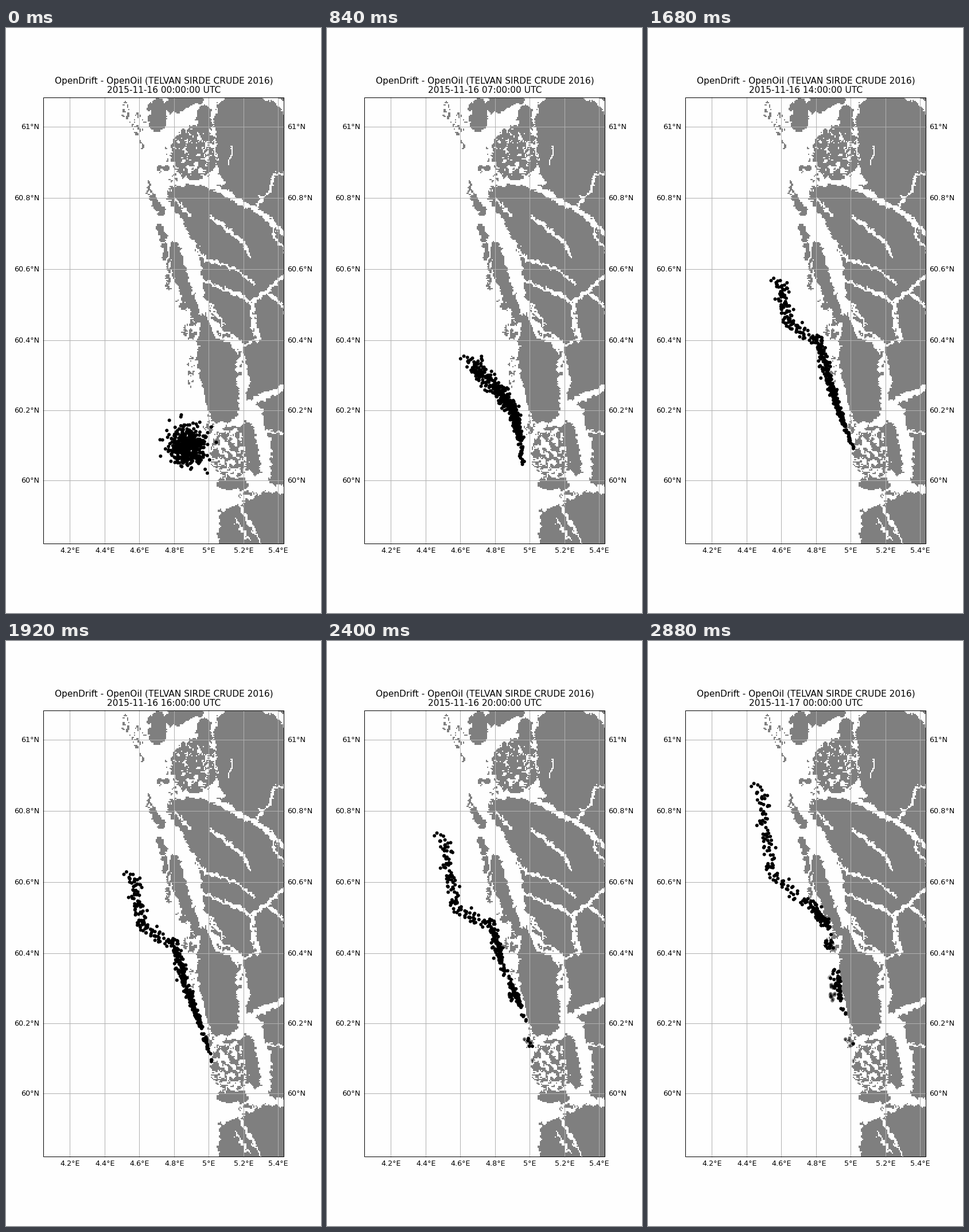
A matplotlib script for the animation above (3 s loop, 549x1019 px).

```python
import numpy as np
import matplotlib.pyplot as plt
from matplotlib.animation import FuncAnimation
from matplotlib.patches import Rectangle

W, H, DPI = 549, 1019, 64
PX = 72 / DPI  # points per pixel
HOURS = 25
LEFT, TOP, RIGHT, BOTTOM = 65, 121, 485, 899
CELL = 2
PAPER = "#fefefe"

plt.rcParams["font.family"] = "DejaVu Sans"
rng = np.random.default_rng(16)

# ---------------------------------------------------------------- land mask
gx, gy = np.meshgrid(np.arange(LEFT + 1, RIGHT, CELL), np.arange(TOP + 1, BOTTOM, CELL))


def smooth_noise():
    n = rng.normal(size=gx.shape)
    for axis in (0, 1):
        n = n + np.roll(n, 1, axis) + np.roll(n, -1, axis)
    return n / n.std()


# Sampling the shapes at shifted places gives a ragged coastline.
sx, sy = gx + 1.6 * smooth_noise(), gy + 1.6 * smooth_noise()


def points(flat):
    return np.array(flat, float).reshape(-1, 2)


def stroke(value, w0, w1, *flat):
    """Paint land (True) or water (False) along a line whose width goes from w0 to w1."""
    line = points(flat)
    parts = len(line) - 1
    for i, ((ax_, ay_), (bx, by)) in enumerate(zip(line[:-1], line[1:])):
        dx, dy = bx - ax_, by - ay_
        s = np.clip(((sx - ax_) * dx + (sy - ay_) * dy) / (dx * dx + dy * dy), 0, 1)
        width = w0 + (w1 - w0) * (i + s) / parts
        land[np.hypot(sx - ax_ - s * dx, sy - ay_ - s * dy) < width / 2] = value


def skerries(x, y, rx, ry, cover):
    """Broken-up islets that cover a share of an ellipse."""
    noise = smooth_noise()
    inside = ((sx - x) / rx) ** 2 + ((sy - y) / ry) ** 2 < 1
    land[inside & (noise > np.quantile(noise, 1 - cover))] = True


# mainland: everything east of its western edge
edge = points((388, 121, 367, 134, 362, 160, 367, 250, 385, 272, 284, 277, 284, 302,
               305, 330, 320, 365, 338, 400, 346, 470, 366, 515, 412, 545, 425, 615,
               418, 650, 448, 665, 450, 700, 462, 712, 460, 800, 440, 818, 372, 842, 370, 899))
land = sx > np.interp(sy, edge[:, 1], edge[:, 0])

# fjords and sounds
stroke(False, 14, 6, 345, 269, 380, 286, 410, 304, 440, 319, 466, 341, 490, 366)
stroke(False, 5, 5, 490, 251, 467, 255, 460, 282, 438, 308)
stroke(False, 5, 5, 465, 338, 466, 362, 490, 390)
stroke(False, 4, 4, 296, 300, 320, 326)
stroke(False, 6, 6, 357, 329, 414, 372, 423, 395)
stroke(False, 6, 4, 325, 372, 345, 402, 398, 419, 433, 446)
stroke(False, 5, 7, 338, 437, 410, 466, 426, 480, 458, 454, 490, 427)
stroke(False, 9, 9, 428, 482, 432, 520, 441, 540)
stroke(False, 5, 5, 441, 542, 414, 552)
stroke(False, 5, 5, 456, 460, 480, 483, 488, 500)
stroke(False, 5, 5, 350, 475, 378, 517)
stroke(False, 3, 3, 394, 205, 391, 240)
stroke(False, 14, 10, 412, 664, 440, 645, 490, 624)
stroke(False, 6, 3, 440, 700, 490, 708)
stroke(False, 14, 14, 410, 815, 455, 800, 490, 806)
stroke(False, 6, 4, 408, 832, 428, 868, 446, 896)
stroke(False, 4, 4, 400, 858, 424, 892)
stroke(False, 14, 14, 452, 117, 478, 130, 492, 148)

# islands
stroke(True, 32, 30, 264, 138, 263, 166)
stroke(True, 28, 16, 291, 134, 335, 124)
stroke(True, 24, 28, 346, 145, 345, 168)
stroke(True, 18, 18, 319, 280, 324, 284)
stroke(True, 12, 10, 270, 243, 281, 245)
stroke(True, 12, 16, 256, 297, 270, 318)
stroke(True, 5, 8, 248, 268, 251, 286)
stroke(True, 10, 13, 267, 345, 276, 367)
stroke(True, 9, 9, 277, 380, 278, 400)
stroke(True, 18, 26, 295, 382, 303, 430)
stroke(True, 26, 14, 303, 430, 333, 505)
stroke(True, 14, 32, 345, 506, 350, 545)
stroke(True, 70, 54, 366, 575, 379, 662)
stroke(True, 26, 20, 420, 700, 435, 770)
stroke(True, 20, 22, 378, 793, 411, 794)
for islets in ((328, 218, 41, 47, .82), (209, 146, 6, 16, .35), (229, 168, 11, 20, .3),
               (238, 204, 4, 8, .4), (281, 218, 4, 14, .3), (295, 262, 10, 8, .5),
               (285, 430, 7, 28, .5), (311, 478, 11, 13, .7), (321, 525, 13, 20, .55),
               (323, 598, 6, 30, .4), (384, 525, 20, 18, .45), (406, 583, 6, 28, .6),
               (353, 690, 9, 22, .35), (395, 738, 40, 46, .55), (425, 818, 18, 12, .5)):
    skerries(*islets)
stroke(False, 3, 3, 364, 180, 368, 252)

# ---------------------------------------------------------------- oil drift
N = 480
start = rng.normal((315, 728), (15.5, 16), (N, 2))
order = -(start - (315, 728)) @ (0.35, 0.9) + rng.normal(0, 6, N)
u = order.argsort().argsort() / (N - 1)  # 0: southern tail, 1: northern tip
noise = rng.normal(size=(N, 2)) * (0.35 + u)[:, None]

# The slick is a chain of markers; each follows its own path through these hours.
path_hours = (4, 10, 14, 20, 24)
markers = {
    0.00: points((341, 772, 339, 746, 358, 732, 361, 720, 360, 702)),
    0.06: points((338, 738, 338, 700, 344, 695, 340, 640, 337, 630)),
    0.40: points((326, 705, 322, 628, 316, 618, 305, 560, 318, 500)),
    0.72: points((306, 675, 292, 589, 298, 545, 287, 494, 287, 463)),
    0.84: points((290, 656, 264, 568, 245, 515, 225, 468, 216, 408)),
    1.00: points((270, 634, 235, 523, 230, 440, 202, 337, 195, 250)),
}


def slick(hour):
    chain = [[np.interp(hour, path_hours, c) for c in path.T] for path in markers.values()]
    curve = [np.interp(u, list(markers), c) for c in np.transpose(chain)]
    return np.transpose(curve) + noise * (4.5 + 4 * np.exp((4 - hour) / 3))


def drift(hour):
    if hour >= path_hours[0]:
        return slick(hour)
    f = hour / path_hours[0]
    return start * (1 - f) + slick(path_hours[0]) * f


def on_land(pos):
    col, row = ((pos - (LEFT, TOP)) / CELL).astype(int).T
    return land[row, col]


# Particles stop where they reach the shore.
track = np.array([drift(h) for h in range(HOURS)])
stranded = np.full(N, HOURS)
for h in range(13, HOURS):
    held = stranded < h
    track[h, held] = track[h - 1, held]
    stranded[~held & on_land(track[h])] = h

# Some of the oil south of the bend sinks on the way.
lifetime = np.where(u > 0.84, HOURS, rng.uniform(0, 1, N) * HOURS / 0.4)

# ---------------------------------------------------------------- figure
fig = plt.figure(figsize=(W / DPI, H / DPI), dpi=DPI, facecolor=PAPER)
ax = fig.add_axes([0, 0, 1, 1])
ax.axis("off")

image = np.zeros(land.shape + (4,))
image[land] = (0.5, 0.5, 0.5, 1)
ax.imshow(image, extent=(LEFT, RIGHT, BOTTOM, TOP), interpolation="nearest",
          aspect="auto", zorder=1)
ax.set(xlim=(0, W), ylim=(H, 0))


def label(x, y, text, size=12.8, **align):
    return ax.text(x, y, text, fontsize=size * PX, color="black", zorder=6, **align)


def grid_line(xs, ys):
    ax.plot(xs, ys, color="#b0b0b0", lw=PX, snap=False, zorder=2)


def mercator(lat):
    return np.log(np.tan(np.pi / 4 + np.radians(lat) / 2))


for k in range(7):
    x = int(111.8 + 60.5 * k) + 0.5
    grid_line([x, x], [TOP, BOTTOM])
    label(x, 911, f"{4.2 + 0.2 * k:.3g}°E", ha="center", va="center")

for k in range(6):
    lat = 61 - 0.2 * k
    y = int(172.2 + 17376 * (mercator(61) - mercator(lat))) + 0.5
    grid_line([LEFT, RIGHT], [y, y])
    label(58.5, y - 0.5, f"{lat:.3g}°N", ha="right", va="center")
    label(490.5, y - 0.5, f"{lat:.3g}°N", ha="left", va="center")

ax.add_patch(Rectangle((65.5, 121.5), 419, 777, fill=False, ec="black", lw=PX,
                       snap=False, zorder=5))
label(275, 97.2, "OpenDrift - OpenOil (TELVAN SIRDE CRUDE 2016)", 15.4,
      ha="center", va="baseline")
clock = label(275, 113.2, "", 15.4, ha="center", va="baseline")
dots = ax.scatter(*start.T, s=(6 * PX) ** 2, color="black", linewidths=0, zorder=4)


def update(hour):
    colors = np.zeros((N, 4))
    colors[:, 3] = np.where(hour - stranded > 3, 0.22, 1.0) * (lifetime >= hour)
    dots.set_offsets(track[hour])
    dots.set_facecolors(colors)
    clock.set_text(f"2015-11-{16 + hour // 24} {hour % 24:02d}:00:00 UTC")
    return dots, clock


anim = FuncAnimation(fig, update, frames=HOURS, interval=120, repeat=True, repeat_delay=0)
plt.show()
```
